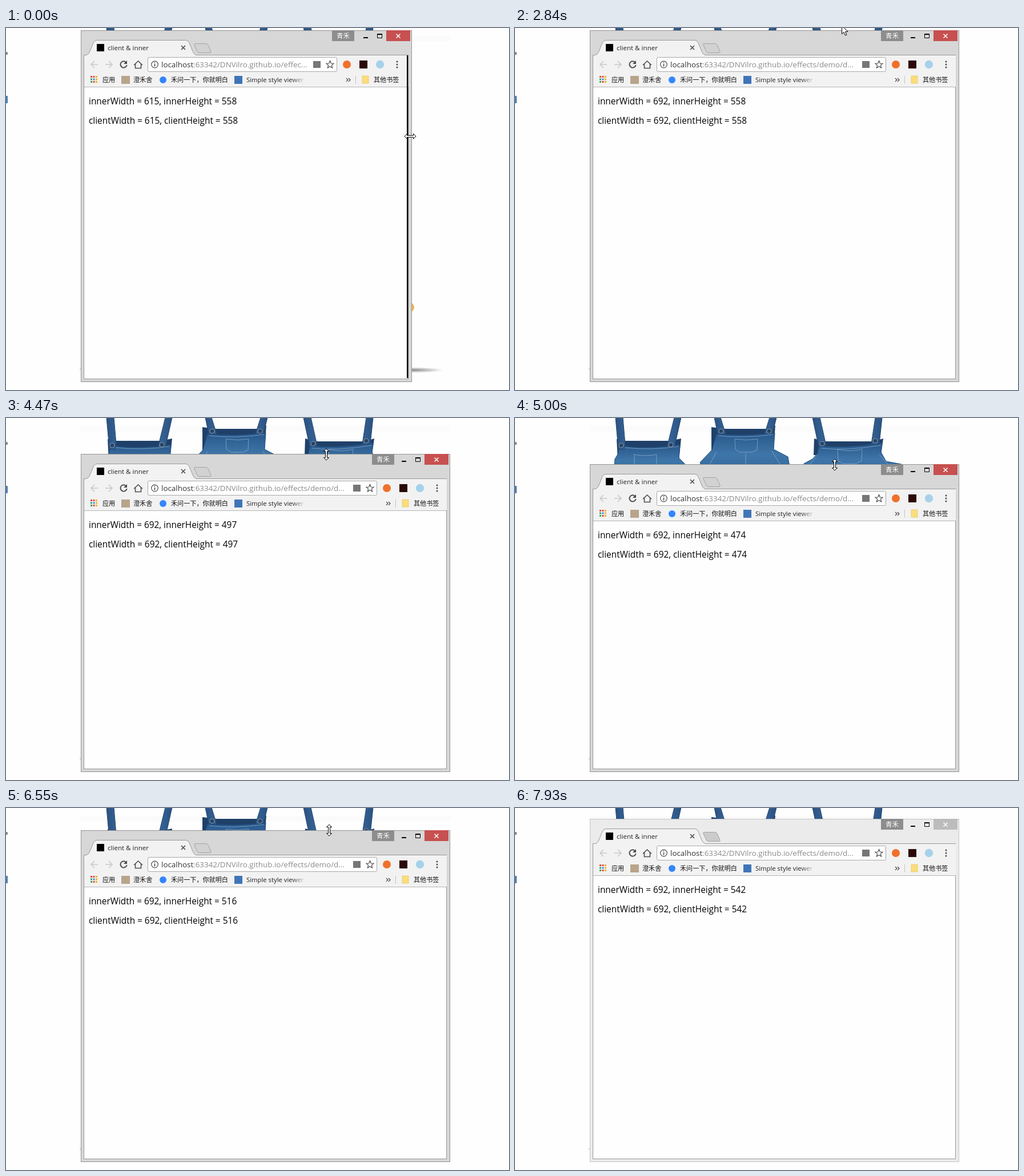
Animation, 881 px wide and 635 px high, one loop 8.03 s. Source, as an HTML page:

```html
<!DOCTYPE html>
<html lang="en">
<head>
<meta charset="utf-8">
<title>client &amp; inner</title>
<style>
  html, body { margin: 0; width: 100%; height: 100%; overflow: hidden; background: #fefefe; }
  svg { display: block; }
  text { font-family: "Open Sans", "Noto Sans CJK SC", "Noto Sans CJK", sans-serif; font-size: 11.3px; fill: #222; white-space: pre; }
  .cjk { font-family: "Noto Sans CJK SC", "Noto Sans CJK", sans-serif; font-size: 11.1px; fill: #111; }
  .page { font-size: 15.4px; fill: #000; }
  .url { font-size: 13.4px; fill: #8a8a8a; }
  .line { fill: none; stroke: #4c4c4c; stroke-width: 1.6; }
  .denim { fill: url(#denim); stroke: #24507f; }
  .strap { fill: url(#strap); stroke: #24476f; }
  .back { fill: #1f4069; }
  .stitch { fill: none; stroke: #86a9c9; stroke-width: .8; }
  .button { fill: #2a4260; stroke: #7d95ad; }
  .pointer { fill: #fff; stroke: #000; }
</style>
</head>
<body>
<svg width="881" height="635" viewBox="0 0 881 635">
  <defs>
    <linearGradient id="denim" x2="0" y2="1">
      <stop offset="0" stop-color="#28578a"/><stop offset=".45" stop-color="#3f76a9"/><stop offset="1" stop-color="#2e6496"/>
    </linearGradient>
    <linearGradient id="strap">
      <stop offset="0" stop-color="#2a5283"/><stop offset=".5" stop-color="#4d83b3"/><stop offset="1" stop-color="#2a5283"/>
    </linearGradient>
    <linearGradient id="fade">
      <stop offset="0" stop-color="#f2f2f2" stop-opacity="0"/><stop offset="1" stop-color="#f2f2f2"/>
    </linearGradient>
    <radialGradient id="floor">
      <stop offset="0" stop-color="#888"/><stop offset="1" stop-color="#888" stop-opacity="0"/>
    </radialGradient>
  </defs>

  <g id="desktop">
    <rect x="130" y="14" width="648" height="10" fill="#fbfbfb"/>
    <rect x="-2" y="42" width="5" height="5" rx="1" fill="#8b8b8b"/>
    <rect x="-3" y="119" width="6" height="13" rx="1" fill="#4b80b2"/>
    <circle cx="130" cy="598" r="1.5" fill="#ddd"/>
    <ellipse cx="712" cy="600" rx="54" ry="5" fill="url(#floor)"/>
    <circle cx="706" cy="490" r="9" fill="#eeb552"/>

    <path class="back" d="M178 37L192 40H272L291 36L287 75H180Z"/>
    <path class="denim" d="M181 50Q192 48 205 51Q240 54 289 47L287 70L297 80L294 110H172L175 72L181 62Z"/>
    <path class="strap" d="M176-1H189L193 46L191 55H181ZM279-1H291L279 52H266Z"/>
    <path class="stitch" d="M192 52Q240 57 286 50M208 64Q228 68 248 64V92H209V64"/>

    <path class="back" d="M344 16L368 19H440L456 13L452 60H344Z"/>
    <path class="denim" d="M353 28Q400 33 455 26L453 55L478 68L481 85L468 92V110H336L324 78L345 56Z"/>
    <path class="strap" d="M349-1H360L369 28H355ZM446-1H458L451 28H437Z"/>
    <path class="stitch" d="M356 31Q400 36 452 29M385 37Q405 40 425 37L424 56L415 60H394L386 55ZM404 62V95M353 59L339 85M450 58L466 84"/>

    <path class="back" d="M524 36L541 41H628L645 36L641 65H523Z"/>
    <path class="denim" d="M532 49Q580 54 643 44L641 60L650 76L677 81L678 110H506V80L521 72L530 62Z"/>
    <path class="strap" d="M521-1H534L545 48L532 51ZM631-1H643L638 46H624Z"/>
    <path class="stitch" d="M536 53Q580 58 640 48M565 55Q586 60 608 55L607 75L597 80H574L566 75ZM529 65L515 84M638 64L654 82"/>
    <g id="buttons" class="button"></g>
  </g>

  <rect id="frame" x="131.5" stroke="#949494"/>
  <rect id="inner" x="136.5" fill="#fefefe" stroke="#999"/>

  <g id="chrome">
    <rect id="toolbar" x="137" y="48" height="55" fill="#f2f2f2"/>
    <path id="rule" stroke="#b4b4b4"/>
    <path d="M137 47.5H141Q145 46 147 41L153 26Q155 21.500 159 21.500H315Q319 21.500 321 26L327 41Q329 46 333 47.500V49H137Z" fill="#f2f2f2"/>
    <path d="M137 47.5H141Q145 46 147 41L153 26Q155 21.500 159 21.500H315Q319 21.500 321 26L327 41Q329 46 333 47.500" fill="none" stroke="#999"/>
    <path id="tabEdge" stroke="#999"/>
    <path id="newTab" d="M331 27.500H350Q353 27.500 354 30L359 41Q360 43.500 357 43.500H339Q336 43.500 335 41L330 30Q329 27.500 331 27.500Z" stroke="#a3a3a3"/>
    <rect x="159" y="28" width="13" height="13" fill="#000"/>
    <text x="178" y="38.500" style="font-size:11.6px">client &amp; inner</text>
    <path class="line" d="M307 31L314 38M314 31L307 38"/>

    <g class="line">
      <path d="M161 64H149M155 58L149 64L155 70M174 64H186M180 58L186 64L180 70" stroke="#c9c9c9"/>
      <path d="M210.500 60.500A5.600 5.600 0 1 0 211.600 65" stroke-width="2"/>
      <path d="M224 65L231.500 58L239 65M226.500 63V70.500H236.500V63"/>
    </g>
    <path d="M212 57V63H206Z" fill="#4c4c4c"/>
    <rect id="omnibox" x="248.500" y="51.500" height="25" rx="2" fill="#fff" stroke="#a8a8a8"/>
    <circle class="line" cx="260.500" cy="64" r="5.800" style="stroke-width:1.2"/>
    <path class="line" d="M260.500 63V67.500M260.500 60V61.500"/>
    <text class="url" x="272" y="68.500"><tspan fill="#333">localhost</tspan><tspan id="path"></tspan></text>

    <g id="apps"></g>
    <text class="cjk" x="169" y="95">应用</text>
    <rect x="202" y="84" width="15" height="14" fill="#b8a48a"/>
    <text class="cjk" x="223" y="95">澄禾舍</text>
    <circle cx="275" cy="91" r="6" fill="#3385ff"/>
    <text class="cjk" x="289" y="95">禾问一下，你就明白</text>
    <rect x="400" y="84" width="14" height="14" fill="#4074b8"/>
    <text x="421" y="95">Simple style viewer</text>
    <rect x="500" y="82" width="26" height="18" fill="url(#fade)"/>

    <g id="tools">
      <rect x="538" y="58" width="13" height="12" fill="#777"/>
      <path class="line" style="stroke-width:1.2" d="M567.500 57.500L569.300 62L574 62.300L570.400 65.400L571.600 70L567.500 67.400L563.400 70L564.600 65.400L561 62.300L565.700 62Z"/>
      <circle cx="597" cy="64" r="7" fill="#f0702a"/>
      <rect x="619" y="57" width="14" height="14" fill="#2c0808"/>
      <circle cx="655" cy="64" r="7.200" fill="#a5d2ea"/>
      <g fill="#4c4c4c"><circle cx="685" cy="59" r="1.500"/><circle cx="685" cy="64" r="1.500"/><circle cx="685" cy="69" r="1.500"/></g>
      <path class="line" style="stroke-width:1.3" d="M596 88L599 91L596 94M600 88L603 91L600 94"/>
      <path d="M612.500 84V98" stroke="#c4c4c4"/>
      <path d="M624 84H635V97H624Z" fill="#fbdd7c" stroke="#eac75f" stroke-width=".8"/>
      <text class="cjk" x="644" y="95">其他书签</text>
      <rect x="571" y="4" width="39" height="19" fill="#8d8d8d"/>
      <text class="cjk" x="579" y="18" style="font-size:11.5px;fill:#fff">青禾</text>
    </g>
    <g id="caption">
      <path d="M626 17H634" stroke="#000" stroke-width="2"/>
      <path d="M650.500 10.500H658.500V17.500H650.500Z" fill="none" stroke="#000"/>
      <path d="M650 11H659" stroke="#000" stroke-width="2"/>
      <rect id="close" x="666" y="4" width="42" height="19"/>
      <path d="M683.500 10.500L690.500 17.500M690.500 10.500L683.500 17.500" stroke="#fff" stroke-width="1.500"/>
    </g>
    <text class="page" id="innerText" x="145" y="134"></text>
    <text class="page" id="clientText" x="145" y="168"></text>
  </g>

  <path id="lagBar" fill="#000"/>
  <path id="pointer" class="pointer"/>
</svg>
<script>
const $ = id => document.getElementById(id);
const set = (id, attrs) => {
  for (const k in attrs) $(id).setAttribute(k, attrs[k]);
};

const LOOP = 8030, SCALE = 0.9158, BOTTOM = 621;

// Picture changes come in bursts: first time, last time, steps.
const bursts = [
  [0, 0, 1], [120, 600, 5], [1280, 1560, 3], [1980, 2840, 7], [2990, 3270, 2],
  [3550, 4470, 8], [4600, 5150, 4], [5580, 5710, 2], [5980, 6550, 5],
  [6700, 6950, 3], [7100, 7250, 2], [7930, 7930, 1]
];
const steps = bursts.flatMap(([a, b, n]) =>
  Array.from({ length: n }, (_, i) => n > 1 ? a + (b - a) * i / (n - 1) : a));

// time, right edge, reported width, top edge, reported height
const windowKeys = [
  [0, 711, 615, 4, 558], [120, 718, 624, 4, 558], [600, 768, 681, 4, 558],
  [1280, 770, 684, 4, 558], [1560, 772, 686, 4, 558], [1980, 775, 689, 4, 558],
  [2123, 778, 692, 4, 558], [3270, 778, 692, 4, 558], [3550, 778, 692, 8, 555],
  [4470, 778, 692, 63, 497], [4600, 778, 692, 67, 491], [5150, 778, 692, 88, 466],
  [5710, 778, 692, 92, 462], [5980, 778, 692, 91, 463], [6550, 778, 692, 39, 516],
  [6950, 778, 692, 19, 542]
];

// time, x, y
const pointerKeys = [
  [0, 708, 190], [120, 713, 189], [600, 762, 185], [1280, 764, 184], [1560, 766, 183],
  [2123, 773, 180], [2266, 779, 150], [2553, 690, 60], [2840, 572, -5], [2990, 570, 0],
  [3270, 570, 4], [3550, 569, 9], [4470, 561, 64], [5150, 560, 88], [5980, 558, 90],
  [6550, 566, 39], [6950, 573, 19], [7100, 720, 103]
];

const shapes = {
  arrow: "M.5 .5V15.500L4 12.300L6.500 18L9 17L6.500 11.500H11Z",
  wide: "M-10 0L-5.500-4.500V-1.500H5.500V-4.500L10 0L5.500 4.500V1.500H-5.500V4.500Z"
};

function sample(keys, t) {
  const i = keys.findIndex(k => k[0] > t);
  if (i < 0) return keys[keys.length - 1].slice(1);
  const a = keys[i - 1], b = keys[i], p = (t - a[0]) / (b[0] - a[0]);
  return a.slice(1).map((v, j) => Math.round(v + (b[j + 1] - v) * p));
}

const ruler = document.createElement("canvas").getContext("2d");
const host = "localhost";
const fullPath = ":63342/DNVilro.github.io/effects/demo/demo.html";

function clipPath(room) {
  ruler.font = '13.4px "Open Sans", sans-serif';
  let n = fullPath.length;
  while (n > 1 && ruler.measureText(host + fullPath.slice(0, n) + "...").width > room) n--;
  return fullPath.slice(0, n) + "...";
}

function drawPointer(t) {
  const [x, y] = sample(pointerKeys, t);
  const arrow = t > 2200 && t < 3200 || t >= 7100;
  const turn = !arrow && t > 3200 ? " rotate(90)" : "";
  set("pointer", {
    d: arrow ? shapes.arrow : shapes.wide,
    transform: `translate(${x} ${y})${turn}`,
    visibility: t >= 7250 ? "hidden" : "visible"
  });
}

function draw(time) {
  const t = steps.filter(s => s <= time).pop();
  const [right, width, top, height] = sample(windowKeys, t);
  const laidOut = Math.round(144.3 + width * SCALE);
  const active = t < 7930;
  const down = top - 4;

  set("frame", {
    y: top + .5, width: right - 132, height: BOTTOM - top - 1,
    fill: active ? "#d7d7d7" : "#ebebeb", stroke: active ? "#949494" : "#c4c4c4"
  });
  set("inner", { y: top + 43.5, width: right - 143, height: 568 - down });
  set("chrome", { transform: `translate(0 ${down})` });
  set("toolbar", { width: right - 143 });
  set("rule", { d: `M137 103.500H${right - 7}` });
  set("tabEdge", { d: `M333 47.500H${right - 6}` });
  set("newTab", { fill: active ? "#d2d2d2" : "#cbcbcb" });
  set("omnibox", { width: laidOut - 377 });
  set("tools", { transform: `translate(${laidOut - 708} 0)` });
  set("caption", { transform: `translate(${right - 711} 0)` });
  set("close", { fill: active ? "#c75050" : "#bcbcbc" });
  set("lagBar", { d: right - laidOut > 2 && t === 0 ? `M${right - 9} 48h2.500V614h-2.500Z` : "" });

  $("path").textContent = clipPath(right - 453);
  for (const kind of ["inner", "client"])
    $(kind + "Text").textContent = `${kind}Width = ${width}, ${kind}Height = ${height}`;
  drawPointer(t);
}

const appColors = ["#e24b3b", "#e24b3b", "#f0b429", "#3aa757", "#4285f4", "#f0b429", "#3aa757", "#e24b3b", "#f0b429"];
$("apps").innerHTML = appColors.map((c, i) =>
  `<rect x="${148 + i % 3 * 4.5}" y="${84 + Math.floor(i / 3) * 4.5}" width="3" height="3" fill="${c}"/>`).join("");
$("buttons").innerHTML = [[186, 48], [273, 47], [361, 23], [445, 23], [538, 45], [631, 40]]
  .map(([x, y]) => `<circle cx="${x}" cy="${y}" r="4"/>`).join("");

function tick() {
  draw(performance.now() % LOOP);
  requestAnimationFrame(tick);
}
tick();
</script>
</body>
</html>
```
